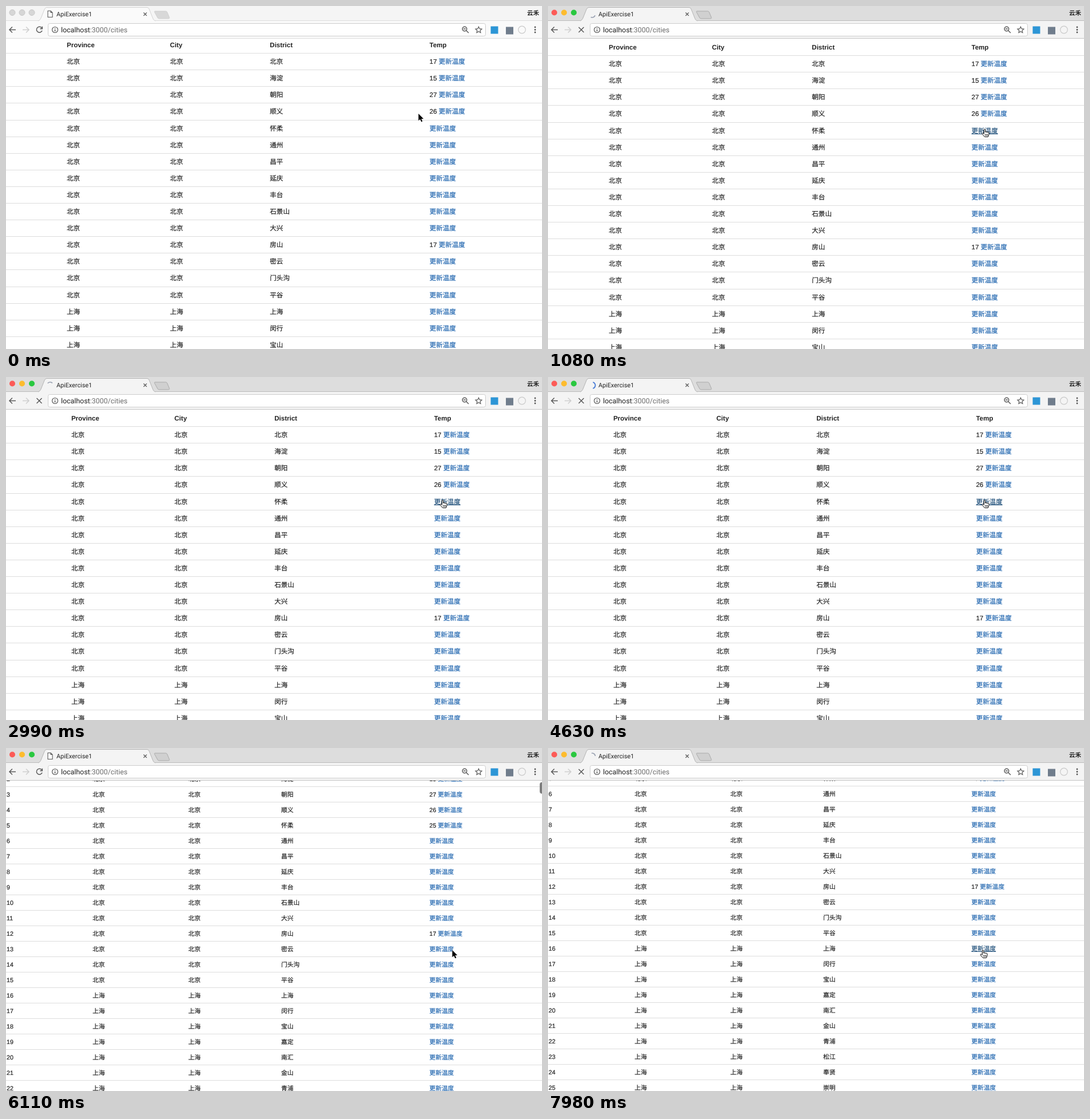
An HTML page that plays this animation: 935x599 px, repeating every 8000 ms.

```html
<!DOCTYPE html>
<html lang="zh-CN">
<head>
<meta charset="utf-8">
<title>ApiExercise1</title>
<style>
  html, body { margin: 0; width: 100%; height: 100%; overflow: hidden; background: #fff; }
  #stage { position: relative; width: 935px; height: 599px; overflow: hidden; background: #fff; }
  .page { position: absolute; left: 0; top: 0; width: 1100px; color: #222;
    font-family: "Liberation Sans", "Noto Sans CJK SC", "Noto Sans CJK", sans-serif;
    text-rendering: geometricPrecision; -webkit-text-stroke: 0.2px; }
  .row { position: absolute; left: 0; width: 100%; border-top: 1px solid #ddd; white-space: pre; }
  .row span { position: absolute; top: 1px; }
  .head { font-weight: bold; border-color: transparent; -webkit-text-stroke: 0; }
  .page a { color: #2468b0; }
  .page a.hover { color: #23527c; text-decoration: underline; }
  #thumb { position: absolute; left: 931px; top: 59px; width: 8px; height: 20px; border-radius: 4px; background: #7d7d7d; }
  svg { position: absolute; left: 0; top: 0; }
  svg text { font-family: Roboto, "Noto Sans CJK SC", "Noto Sans CJK", sans-serif; text-rendering: geometricPrecision; }
  .line { fill: none; stroke: #5a5a5a; stroke-width: 1.5; }
</style>
</head>
<body>
<div id="stage">
  <div class="page" id="zoomed"></div>
  <div class="page" id="plain"></div>
  <div id="thumb"></div>
  <svg width="935" height="599" viewBox="0 0 935 599">
    <rect id="bar" width="935" height="26"/>
    <rect y="25" width="935" height="1" id="barEdge"/>
    <rect id="tools" y="26" width="935" height="30"/>
    <rect y="56" width="935" height="1" id="toolsEdge"/>
    <g id="lights"><circle cx="11" cy="11.5" r="5"/><circle cx="28" cy="11.5" r="5"/><circle cx="45" cy="11.5" r="5"/></g>
    <path id="tab" d="M56 26C59 25 60 23 61 21L67 6Q68.500 2.500 71 2.500H246Q249 2.500 250 6L256 21C257 24 258 25 261 26"/>
    <path id="newTab" d="M260 9H278.500Q280.500 9 281.300 11L285 20Q285.600 22 283.500 22H267Q265 22 264.200 20L259 10.500Q258.500 9 260 9Z"/>
    <path id="icon" d="M73 8.500H78L81 11.500V19.500H73ZM78 8.500V11.500H81" fill="#fff" stroke="#555" stroke-width="1.100"/>
    <circle id="spin" cx="77" cy="14.500" r="5.500" pathLength="360" fill="none" stroke-width="1.700"/>
    <text x="88" y="18" font-size="10.800" fill="#222">ApiExercise1</text>
    <path d="M240 11.500L245.500 17M245.500 11.500L240 17" class="line" style="stroke-width:1.200"/>
    <text x="909" y="15.500" font-size="10.500" font-weight="700" fill="#222">云禾</text>

    <path d="M17 41.500H6.500M11 36.500L6 41.500L11 46.500" class="line"/>
    <path d="M29 41.500H39.500M35 36.500L40 41.500L35 46.500" class="line" style="stroke:#cfcfcf"/>
    <path id="reload" d="M62.500 38.500A5 5 0 1 0 63 43M63.300 35.800V39.800H59.300" class="line"/>
    <path id="stop" d="M53.500 37L62.500 46M62.500 37L53.500 46" class="line"/>
    <rect x="73.500" y="30.500" width="763" height="22" rx="3" fill="#fff" stroke="#cdcdcd"/>
    <circle cx="85.500" cy="41.500" r="5" class="line" style="stroke-width:1.200"/>
    <path d="M85.500 41V44.500M85.500 38.300V39.700" class="line"/>
    <text x="96" y="46" font-size="12.380" fill="#1f1f1f">localhost<tspan fill="#6c6c6c">:3000/cities</tspan></text>
    <circle cx="800" cy="40" r="3.800" class="line"/>
    <path d="M803 43L807 47M798 40H802" class="line"/>
    <path d="M824.500 36.200L826.100 39.700 830 40.100 827.100 42.700 827.900 46.500 824.500 44.500 821.100 46.500 821.900 42.700 819 40.100 822.900 39.700Z" class="line" style="stroke-width:1.200"/>
    <rect x="845.500" y="35.500" width="13" height="13" fill="#2d96d6"/>
    <rect x="872" y="36.500" width="13" height="13" fill="#707d8c"/>
    <circle cx="900" cy="41.500" r="6.300" fill="none" stroke="#cacaca" stroke-width="1.200"/>
    <g fill="#555"><circle cx="923" cy="37" r="1.400"/><circle cx="923" cy="41.500" r="1.400"/><circle cx="923" cy="46" r="1.400"/></g>

    <path id="arrow" d="M0 0V12.300L2.900 9.700 4.900 14.300 7 13.400 5 9H8.800Z" fill="#000" stroke="#fff" stroke-width="1" paint-order="stroke"/>
    <path id="hand" d="M4 8V1.800A1.200 1.200 0 0 1 6.400 1.800V5.800A1.100 1.100 0 0 1 8.600 6.100 1.100 1.100 0 0 1 10.700 6.500 1 1 0 0 1 12.600 7.200V10L11.200 14H5.200L1 9.200A1.100 1.100 0 0 1 2.600 7.700L4 9ZM6.400 9.500V12M8.400 9.500V12M10.300 9.500V12" fill="#fff" stroke="#000" stroke-width="1"/>
  </svg>
</div>
<script>
const LOOP = 8000;
const $ = id => document.getElementById(id);

const districts = ('北京 海淀 朝阳 顺义 怀柔 通州 昌平 延庆 丰台 石景山 大兴 房山 密云 门头沟 平谷 ' +
  '上海 闵行 宝山 嘉定 南汇 金山 青浦 松江 奉贤 崇明').split(' ');
const columns = [1, 151, 318, 480, 738.5];

// Moments at which the screen is refreshed
const ticks = [0, 150, 300, 450, 630, 780, 930, 1080,
  1230, 1370, 1520, 1660, 1820, 1960, 2100, 2250,
  2400, 2550, 2700, 2840, 2990, 3140, 3290, 3440,
  3590, 3740, 3890, 4040, 4180, 4330, 4480, 4630,
  4770, 4920, 5070, 5360, 5510, 5660,
  6110, 6260, 6410, 6590, 6760, 7240, 7390, 7540, 7690, 7830, 7980];

// time, x, y, shape
const pointer = [
  [0, 719.5, 188, 'arrow'], [150, 724, 190, 'arrow'], [300, 736, 198, 'arrow'],
  [450, 750, 208, 'arrow'], [630, 760, 214, 'arrow'], [780, 756.5, 214.5, 'hand'],
  [5360, 763, 228, 'arrow'], [5510, 774, 305, 'arrow'], [5660, 778.5, 353, 'arrow'],
  [7240, 768, 353, 'arrow'], [7390, 753.5, 352.5, 'hand']
];
const topOffset = [[0, 53], [150, 54], [300, 56], [450, 57]];
const scroll = [[0, 0], [6110, 72], [6260, 112], [6410, 142], [6590, 151], [6760, 154]];

const last = (table, t) => table.filter(step => step[0] <= t).pop();

function buildPage(id, scale, pitch, temps) {
  const row = (cells, i) => {
    const spans = cells.map((cell, c) => `<span style="left:${columns[c] * scale}px">${cell}</span>`).join('');
    return `<div class="row${i ? '' : ' head'}" style="top:${Math.round(pitch * i)}px">${spans}</div>`;
  };
  const rows = [row(['', 'Province', 'City', 'District', 'Temp'], 0)];
  districts.forEach((name, k) => {
    const city = k < 15 ? '北京' : '上海';
    const temp = temps[k + 1] ? temps[k + 1] + ' ' : '';
    rows.push(row([k + 1, city, city, name, temp + '<a>更新温度</a>'], k + 1));
  });
  const page = $(id);
  page.style.fontSize = 10.7 * scale + 'px';
  page.style.lineHeight = Math.floor(pitch) - 1 + 'px';
  page.innerHTML = rows.join('');
  return page;
}

const temps = { 1: 17, 2: 15, 3: 27, 4: 26, 12: 17 };
const zoomed = buildPage('zoomed', 1.077, 29.1, temps);
const plain = buildPage('plain', 1, 27, { ...temps, 5: 25 });
const zoomedLink = zoomed.querySelectorAll('a')[4];
const plainLink = plain.querySelectorAll('a')[15];

const show = (el, on) => { el.style.display = on ? '' : 'none'; };
const move = (el, x, y) => { el.style.transform = `translate(${x}px, ${y}px)`; };
const paint = (id, fill, stroke = 'none') => {
  $(id).setAttribute('fill', fill);
  $(id).setAttribute('stroke', stroke);
};

function drawWindow(active) {
  paint('bar', active ? '#dddddd' : '#f5f5f5');
  paint('barEdge', active ? '#bcbcbc' : '#dcdcdc');
  paint('tools', active ? '#f4f4f4' : '#fafafa');
  paint('toolsEdge', active ? '#c4c4c4' : '#dcdcdc');
  paint('tab', active ? '#f4f4f4' : '#fafafa', active ? '#b4b4b4' : '#d2d2d2');
  paint('newTab', active ? '#d0d0d0' : '#d8d8d8', active ? '#ababab' : '#d0d0d0');
  const colors = active ? ['#fc5b57', '#fdbc2e', '#2ac840'] : ['#d6d6d6', '#d6d6d6', '#d6d6d6'];
  [...$('lights').children].forEach((dot, i) => {
    dot.setAttribute('fill', colors[i]);
    dot.setAttribute('stroke', active ? 'none' : '#c6c6c6');
  });
}

function drawLoading(t) {
  const loading = t >= 1080 && t < 5070 || t >= 7540;
  const receiving = t >= 4630 && t < 5070;
  const begun = t >= 7540 ? 7540 : 1080;
  const angle = receiving ? -75 + (t - 4630) * 0.6 : 20 - (t - begun) * 360 / 1320;
  const spin = $('spin');
  show(spin, loading);
  show($('icon'), !loading);
  show($('stop'), loading);
  show($('reload'), !loading);
  spin.setAttribute('stroke', receiving ? '#4378d6' : '#9aa2b2');
  spin.setAttribute('stroke-dasharray', receiving ? '150 210' : '95 265');
  spin.setAttribute('transform', `rotate(${angle} 77 14.5)`);
}

function drawPage(t) {
  const before = t < 4770;
  const slide = t < 1230 ? 1 : Math.exp(-(t - 1080) / 234);
  show(zoomed, before);
  show(plain, !before);
  move(zoomed, -48.7 - 7.9 * slide, last(topOffset, t)[1]);
  move(plain, 0, 58 - last(scroll, t)[1]);
  zoomedLink.classList.toggle('hover', t >= 780);
  plainLink.classList.toggle('hover', t >= 7390);
  show($('thumb'), t >= 6110 && t < 7240);
  move($('thumb'), 0, last(scroll, t)[1] / 90);
}

function drawPointer(t) {
  const [, x, y, shape] = last(pointer, t);
  for (const id of ['arrow', 'hand']) {
    show($(id), id === shape);
    $(id).setAttribute('transform', `translate(${x} ${y})`);
  }
}

function draw(t) {
  drawWindow(t >= 300);
  drawLoading(t);
  drawPage(t);
  drawPointer(t);
}

const start = performance.now();
let shown = -1;
function frame() {
  const now = (performance.now() - start) % LOOP;
  const tick = ticks.filter(t => t <= now).pop();
  if (tick !== shown) draw(shown = tick);
  requestAnimationFrame(frame);
}
draw(0);
frame();
</script>
</body>
</html>
```
